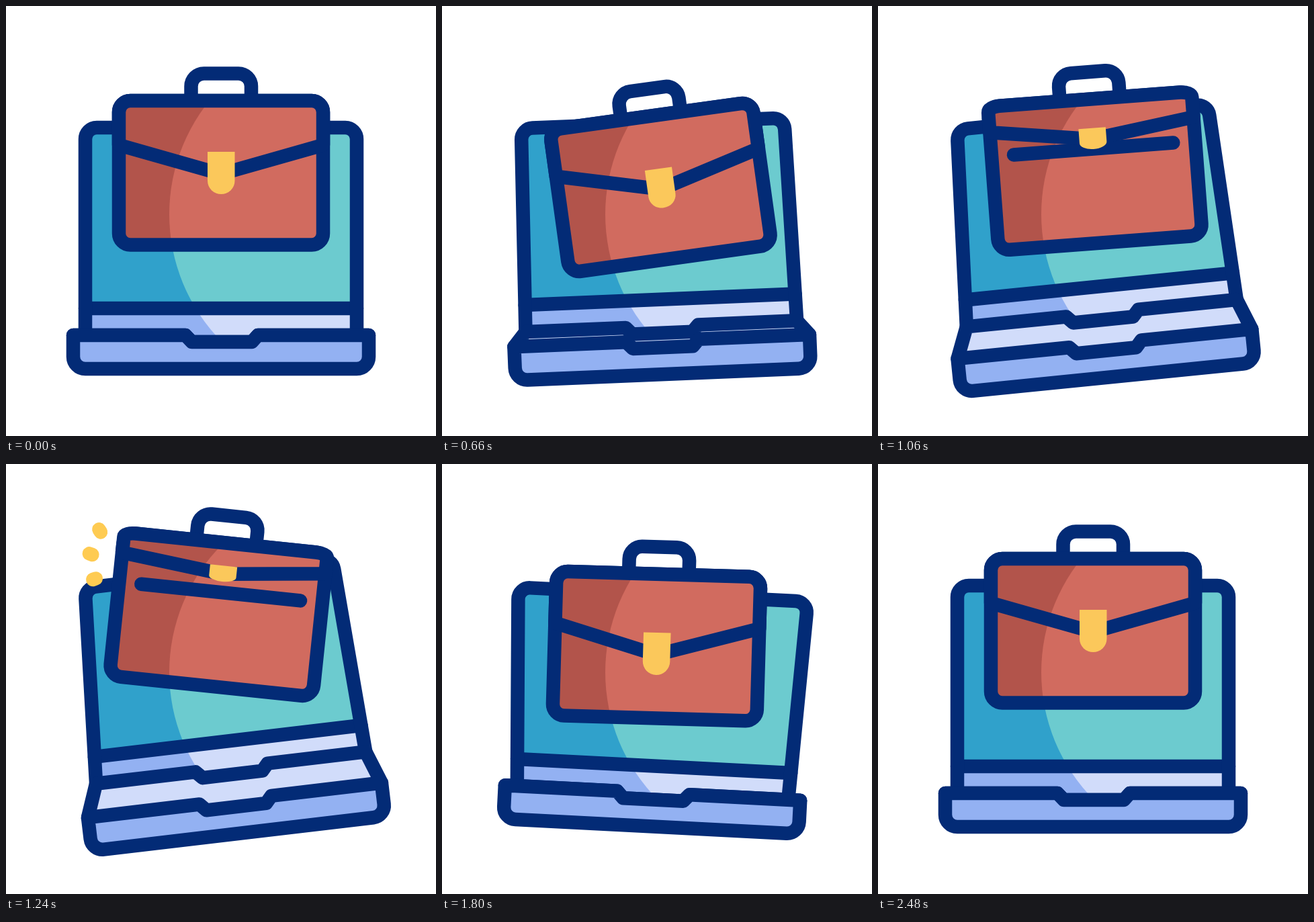
Animation, 640 px wide and 640 px high, one loop 3 s. Source, as an HTML page with a canvas:

```html
<!DOCTYPE html>
<html lang="en">
<head>
<meta charset="utf-8">
<title>Laptop and briefcase</title>
<style>
html, body { margin: 0; width: 100%; height: 100%; overflow: hidden; background: #fff; }
canvas { display: block; width: 640px; height: 640px; }
</style>
</head>
<body>
<canvas id="stage" width="640" height="640"></canvas>
<script>
const ctx = document.getElementById('stage').getContext('2d');
const LOOP = 3000, START = 200, OPEN = 1380, REBOUND = 1810, END = 2480;
const NAVY = '#032b76', YELLOW = '#fbc85b', LILAC = '#93b1f2', PALE = '#d1dcfa';
const RED = ['#b2544b', '#d16b5f'], TEAL = ['#30a1cb', '#6ccbcf'], BLUE = [LILAC, PALE];

const rad = deg => deg * Math.PI / 180;
const progress = (t, from, to) => Math.min(1, Math.max(0, (t - from) / (to - from)));
const ease = u => u * u * (3 - 2 * u);

// Eases from one [time, value] stop to the next
function path(t, ...stops) {
  let v = stops[0][1];
  for (let i = 1; i < stops.length; i++) {
    const [from] = stops[i - 1], [to, next] = stops[i];
    v += (next - stops[i - 1][1]) * ease(progress(t, from, to));
  }
  return v;
}

// Rest, open, rebound and back to rest
const swing = (t, rest, open, back) =>
  path(t, [START, rest], [OPEN, open], [REBOUND, back], [END, rest]);

// Lean left, lean right, rebound and back to rest
const sway = (t, rest, left, right, back) =>
  path(t, [START, rest], [860, left], [1520, right], [REBOUND, back], [END, rest]);

function pose(x, y, turn) {
  ctx.translate(x, y);
  ctx.rotate(rad(turn));
}

function poly(pts) {
  const p = new Path2D();
  pts.forEach(q => p.lineTo(...q));
  return p;
}

function fill(shape, color) {
  ctx.fillStyle = color;
  ctx.fill(shape);
}

// Two tones divided by one circle that stays fixed on the stage
function shade(shape, [dark, light]) {
  fill(shape, dark);
  ctx.save();
  ctx.clip(shape);
  ctx.resetTransform();
  ctx.beginPath();
  ctx.arc(512, 310, 269, 0, 2 * Math.PI);
  ctx.fillStyle = light;
  ctx.fill();
  ctx.restore();
}

const notchLine = half => [[-half, 0], [-53, 0], [-43.5, 10], [46, 10], [55, 0], [half, 0]];

const base = poly(notchLine(220));
base.arcTo(220, 50, 202, 50, 18);
base.arcTo(-220, 50, -220, 32, 18);
base.closePath();

function toward(a, b, dist) {
  const k = dist / Math.hypot(b[0] - a[0], b[1] - a[1]);
  return [a[0] + (b[0] - a[0]) * k, a[1] + (b[1] - a[1]) * k];
}

function drawLaptop(t) {
  const x = swing(t, 320, 341.2, 313.5);
  const y = path(t, [START, 490], [1000, 503.2], [OPEN, 499], [REBOUND, 489.5], [END, 490]);
  const turn = swing(t, 0, -7, 2.95);
  const depth = path(t, [START, 0], [1200, 48.5], [OPEN, 48.5], [REBOUND, 0]);
  const c = Math.cos(rad(turn)), s = Math.sin(rad(turn));
  const place = (px, py) => [x + px * c - py * s, y + px * s + py * c];

  const front = notchLine(220).map(p => place(...p));
  const back = notchLine(202).map(([px, py]) => place(px, py - depth));
  const bl = back[0], br = back[5];
  const tl = [swing(t, 118, 117.5, 113.5), swing(t, 181, 184.7, 183.5)];
  const tr = [swing(t, 522, 484, 544.5), swing(t, 181, 138.7, 205)];
  const bar = [toward(bl, tl, 40), toward(br, tr, 40)];

  const frame = poly([bl]);
  frame.arcTo(...tl, ...tr, 17);
  frame.arcTo(...tr, ...br, 17);
  frame.lineTo(...br);

  shade(frame, TEAL);
  shade(poly([...bar, ...[...back].reverse()]), BLUE);
  fill(poly([...back, ...[...front].reverse()]), PALE);
  ctx.stroke(poly(bar));
  ctx.stroke(frame);
  ctx.stroke(poly([front[0], ...back, front[5]]));

  ctx.save();
  pose(x, y, turn);
  fill(base, LILAC);
  ctx.stroke(base);
  ctx.restore();
}

const body = new Path2D();
body.roundRect(-152, -107, 304, 214.5, 17);

const handle = poly([[-44.5, -107]]);
handle.arcTo(-44.5, -147.5, 0, -147.5, 19);
handle.arcTo(45, -147.5, 45, -107, 19);
handle.lineTo(45, -107);

// The flap squashes toward the top edge as it opens
function drawFlap(t) {
  const open = path(t, [500, 0], [1280, 1], [1770, 0]);
  const sag = path(t, [START, 0], [500, 9], [REBOUND, 11], [END, 0]);
  const scale = 1 - 0.625 * open;
  const at = y => sag - 72 * open + scale * y;
  const ry = 17 * scale, side = at(-41.2);

  const flap = poly([[0, at(2)], [-152, side]]);
  flap.ellipse(-135, -107 + ry, 17, ry, 0, Math.PI, 1.5 * Math.PI);
  flap.ellipse(135, -107 + ry, 17, ry, 0, -0.5 * Math.PI, 0);
  flap.lineTo(152, side);
  flap.closePath();
  shade(flap, RED);
  ctx.stroke(flap);

  const clasp = poly([[-20, at(-31)], [20.5, at(-31)]]);
  clasp.ellipse(0.25, at(12), 20.25, 20 * scale, 0, 0, Math.PI);
  fill(clasp, YELLOW);
}

// Three short dashes fan out from the left side
function drawRays(t) {
  if (t < 1160 || t > 1620) return;
  const tail = 14 * progress(t, 1340, 1620);
  const head = 0.1 + 14 * progress(t, 1160, 1400);
  ctx.strokeStyle = '#fecb52';
  ctx.lineWidth = 20.5;
  for (let i = -1; i <= 1; i++) {
    const a = rad(193 - 38 * i);
    const at = d => [-196 + 9 * i * i + d * Math.cos(a), -69 + 34.7 * i + d * Math.sin(a)];
    ctx.stroke(poly([at(tail), at(head)]));
  }
}

function drawBag(t) {
  const y = path(t, [START, 248], [770, 272], [1350, 219], [REBOUND, 271], [END, 248]);
  ctx.save();
  pose(sway(t, 320, 327, 309.5, 319.5), y, sway(t, 0, -10.1, 16, 1.6));
  ctx.stroke(handle);
  shade(body, RED);
  ctx.stroke(body);
  ctx.stroke(poly([[-119, -33], [119, -33]]));
  drawFlap(t);
  drawRays(t);
  ctx.restore();
}

function draw(t) {
  ctx.fillStyle = '#fff';
  ctx.fillRect(0, 0, 640, 640);
  ctx.strokeStyle = NAVY;
  ctx.lineWidth = 20.5;
  ctx.lineJoin = ctx.lineCap = 'round';
  drawLaptop(t);
  drawBag(t);
}

const start = performance.now();
function tick() {
  draw((performance.now() - start) % LOOP);
  requestAnimationFrame(tick);
}
tick();
</script>
</body>
</html>
```
